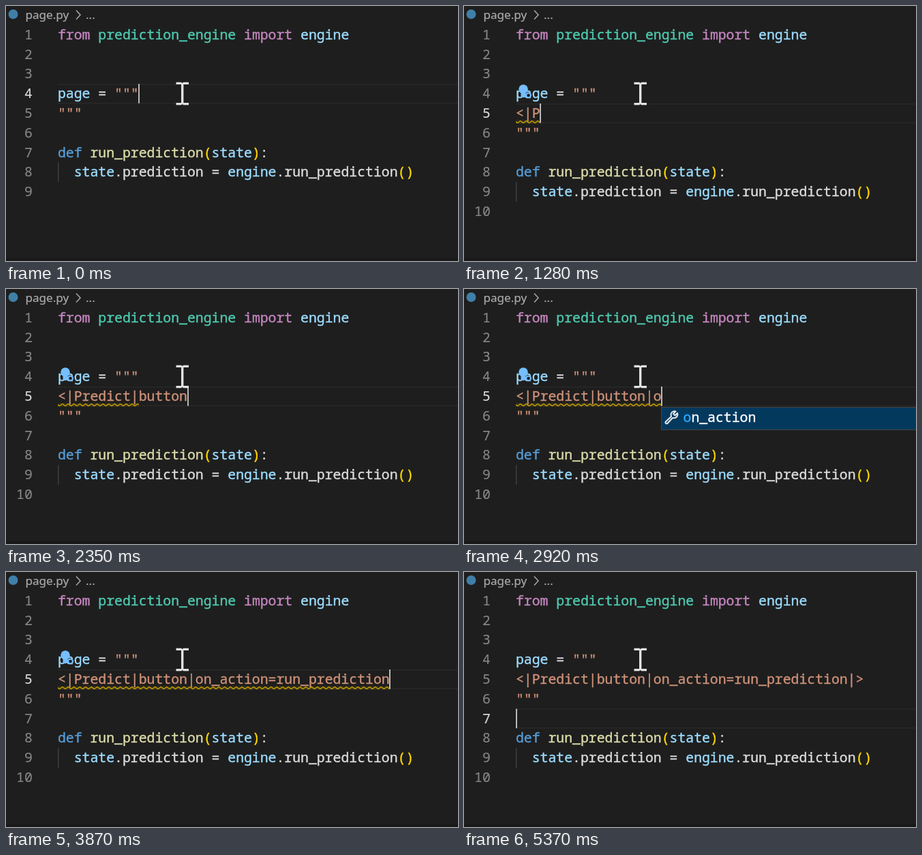
An HTML page that plays this animation: 663x374 px, repeating every 7.37 s.

```html
<!DOCTYPE html>
<html lang="en">
<head>
<meta charset="utf-8">
<title>Editor typing</title>
<style>
  html, body { margin: 0; width: 100%; height: 100%; overflow: hidden; background: #1e1e1e; }
  svg { display: block; width: 663px; height: 374px; }
  text, tspan { fill: currentColor; stroke: currentColor; stroke-width: .4px; }
  text { font: 19.79px "Noto Sans Mono", monospace; font-variant-ligatures: none; white-space: pre; color: #dcdcdc; }
  .crumb { font: 17.1px "Noto Sans", sans-serif; color: #a9a9a9; stroke-width: .2px; }
  .num { color: #858585; text-anchor: end; stroke-width: .2px; }
  .num.on { color: #d8d8d8; }
  .kw { color: #c586c0; } .mod { color: #4ec9b0; } .var { color: #9cdcfe; }
  .str { color: #ce9178; } .def { color: #569cd6; } .fn { color: #dcdcaa; }
  .br { color: #ffd700; } .hit { color: #2aaaff; } .picked { color: #fff; }
</style>
</head>
<body>
<svg viewBox="0 0 663 374">
  <defs>
    <pattern id="wave" width="8.500" height="5" patternUnits="userSpaceOnUse" patternTransform="translate(76 167.500)">
      <path fill="none" stroke="#d3aa00" stroke-width="1.600" d="M-1.750 .9L2.500 4.100L6.750 .9L11 4.100"/>
    </pattern>
    <path id="wrench" fill="none" stroke="#e8e8e8" stroke-width="2" stroke-linejoin="round"
      d="M2 16.500L10 9Q8.500 4 12 2Q14 .8 16.500 1.500L13 5L15.500 7.500L19 4Q20 8 17.500 10Q15 12 12 11L4.500 19Q2.500 20 1.500 18.500Q1 17.500 2 16.500z"/>
    <path id="cube" fill="none" stroke="#b180d7" stroke-width="2" stroke-linejoin="round"
      d="M10 1.500L18 5.500V14.500L10 19L2 14.500V5.500zM2 5.500L10 10L18 5.500M10 10V19"/>
  </defs>

  <rect width="663" height="374" fill="#1e1e1e"/>
  <rect y="370" width="663" height="4" fill="#181818"/>
  <circle cx="10.500" cy="12" r="7" fill="#3f7fa8"/>
  <text class="crumb" x="28.400" y="19.200">page.py</text>
  <path d="M103 6.500L109 13L103 19.500" fill="none" stroke="#a9a9a9" stroke-width="1.500"/>
  <text class="crumb" x="117" y="19.200">...</text>

  <path id="line" fill="none" stroke="#282828" stroke-width="1.500" d="M76 .75H663M76 28.250H663"/>
  <g id="numbers"></g>
  <g id="head"></g>
  <g id="tail"></g>
  <text id="typed" class="str" x="76" y="164"></text>
  <rect id="squiggle" x="76" y="167.500" height="5" fill="url(#wave)"/>
  <g id="bulb" fill="#75beff">
    <path d="M83.500 127H90V133Q86.750 135.500 83.500 133z"/>
    <circle cx="87" cy="122" r="6.800"/>
    <circle cx="94.500" cy="131" r="3.400" fill="#1e1e1e" stroke="#75beff" stroke-width="2.200"/>
  </g>
  <rect id="caret" width="2" height="28.500" fill="#b8b8b8"/>
  <g id="popup"></g>
  <path d="M249.500 111.800H257L258.700 113L260.400 111.800H268V115H260.400V142H268V145.200H260.400L258.700 144L257 145.200H249.500V142H257V115H249.500z" fill="#e2e2e2"/>
</svg>

<script>
const LOOP = 7370, LEFT = 76, CHAR = 11.875, PITCH = 28.8, ROW = 32;
const POPUP_TOP = 173;
const byId = id => document.getElementById(id);
const lineTop = n => 114.2 + (n - 4) * PITCH;
const columnX = n => Math.floor(LEFT + n * CHAR + 0.1);
const show = (id, on) => byId(id).setAttribute('visibility', on ? 'visible' : 'hidden');

// Each code line is a list of [class, text] runs.
const codeLine = (n, ...runs) => `<text x="${LEFT}" y="${lineTop(n) + 21}">` +
  runs.map(([cls, text]) => `<tspan class="${cls}">${text}</tspan>`).join('') + '</text>';

byId('head').innerHTML =
  codeLine(1, ['kw', 'from '], ['mod', 'prediction_engine'], ['kw', ' import '], ['var', 'engine']) +
  codeLine(4, ['var', 'page'], ['', ' = '], ['str', '"""']);
byId('tail').innerHTML =
  codeLine(5, ['str', '"""']) +
  codeLine(7, ['def', 'def '], ['fn', 'run_prediction'], ['br', '('], ['var', 'state'], ['br', ')'], ['', ':']) +
  codeLine(8, ['var', '  state'], ['', '.prediction = '], ['var', 'engine'], ['', '.run_prediction'], ['br', '()']) +
  `<rect x="76" y="${lineTop(8)}" width="1.400" height="${PITCH}" fill="#404040"/>`;
byId('numbers').innerHTML = Array.from({ length: 10 }, (_, i) =>
  `<text class="num" x="38.800" y="${lineTop(i + 1) + 21}">${i + 1}</text>`).join('');
const numbers = [...byId('numbers').children];

const list = (items, height, icon = 'wrench', hit = 0) => ({ items, height, icon, hit });
const controls = list(['button', 'chart', 'content', 'date', 'dialog', 'expandable', 'file_download'], 203);
const options = list(['active', 'hover_text', 'id', 'label', 'on_action', 'properties'], 203);
const action = list(['on_action'], 34, 'wrench', 1);
const handler = list(['run_prediction'], 34, 'cube');
const rest = list(['active', 'hover_text', 'id', 'label', 'properties', 'class_name'], 178);

// Each step changes only the listed parts of the state.
const steps = [];
let state = { line: 4, column: 10, caret: true, text: '', wave: 0, bulb: false, popup: null };
const at = (time, change) => steps.push({ ...(state = { ...state, ...change }), time });
const type = (time, text, change = {}) =>
  at(time, { text: state.text + text, column: state.text.length + text.length, caret: true, ...change });

at(0, {});
at(500, { caret: false });
at(700, { line: 5, column: 0, caret: true });
type(900, '<');
type(970, '|');
at(1030, { wave: 2, popup: controls });
[...'Predict'].forEach((letter, i) =>
  type(1280 + i * 70, letter, { wave: 3 + i, bulb: true, popup: null }));
type(1780, '|', { wave: 10 });
at(1850, { popup: controls });
at(2100, { caret: false });
type(2350, 'button', { popup: null });
type(2600, '|', { wave: 17, popup: options });
type(2850, 'o', { wave: 18, popup: null });
at(2920, { popup: action });
type(3170, 'n_action', { popup: null });
at(3240, { wave: 26 });
type(3310, '=', { wave: 27 });
at(3370, { popup: handler });
type(3870, 'run_prediction', { wave: 41, popup: null });
type(4370, '|', { wave: 42, popup: rest });
type(4670, '>', { popup: null });
at(4920, { wave: 0 });
at(5070, { bulb: false, caret: false });
at(5220, { line: 6, column: 3, caret: true });
at(5370, { line: 7, column: 0 });

function popupMarkup({ items, height, icon, hit }, x) {
  const rows = items.map((label, i) => {
    const y = POPUP_TOP + 1 + i * ROW;
    const back = i ? '' : `<rect x="${x + 1}" y="${y}" width="663" height="${ROW}" fill="#04395e"/>`;
    return `${back}<use href="#${icon}" x="${x + 5}" y="${y + 4}"/>` +
      `<text class="${i ? '' : 'picked'}" x="${x + 32.5}" y="${y + 21}">` +
      `<tspan class="hit">${label.slice(0, hit)}</tspan>${label.slice(hit)}</text>`;
  }).join('');
  return `<svg style="width:663px;height:${POPUP_TOP + height}px">` +
    `<rect x="${x + 0.5}" y="${POPUP_TOP + 0.5}" width="663" height="${height - 1}" fill="#252526" stroke="#454545"/>${rows}</svg>`;
}

function render(s) {
  const opened = s.time >= 700;
  byId('tail').setAttribute('transform', `translate(0 ${opened ? PITCH : 0})`);
  byId('line').setAttribute('transform', `translate(0 ${lineTop(s.line)})`);
  numbers.forEach((el, i) => el.classList.toggle('on', i + 1 === s.line));
  numbers[9].setAttribute('visibility', opened ? 'visible' : 'hidden');
  byId('typed').textContent = s.text;
  byId('squiggle').setAttribute('width', s.wave * CHAR);
  byId('caret').setAttribute('x', columnX(s.column));
  byId('caret').setAttribute('y', lineTop(s.line));
  show('caret', s.caret);
  show('bulb', s.bulb);
  byId('popup').innerHTML = s.popup ? popupMarkup(s.popup, columnX(s.column)) : '';
}

const start = performance.now();
let shown = null;
function tick() {
  const time = (performance.now() - start) % LOOP;
  const current = steps.findLast(s => s.time <= time);
  if (current !== shown) render(shown = current);
  requestAnimationFrame(tick);
}
tick();
</script>
</body>
</html>
```
